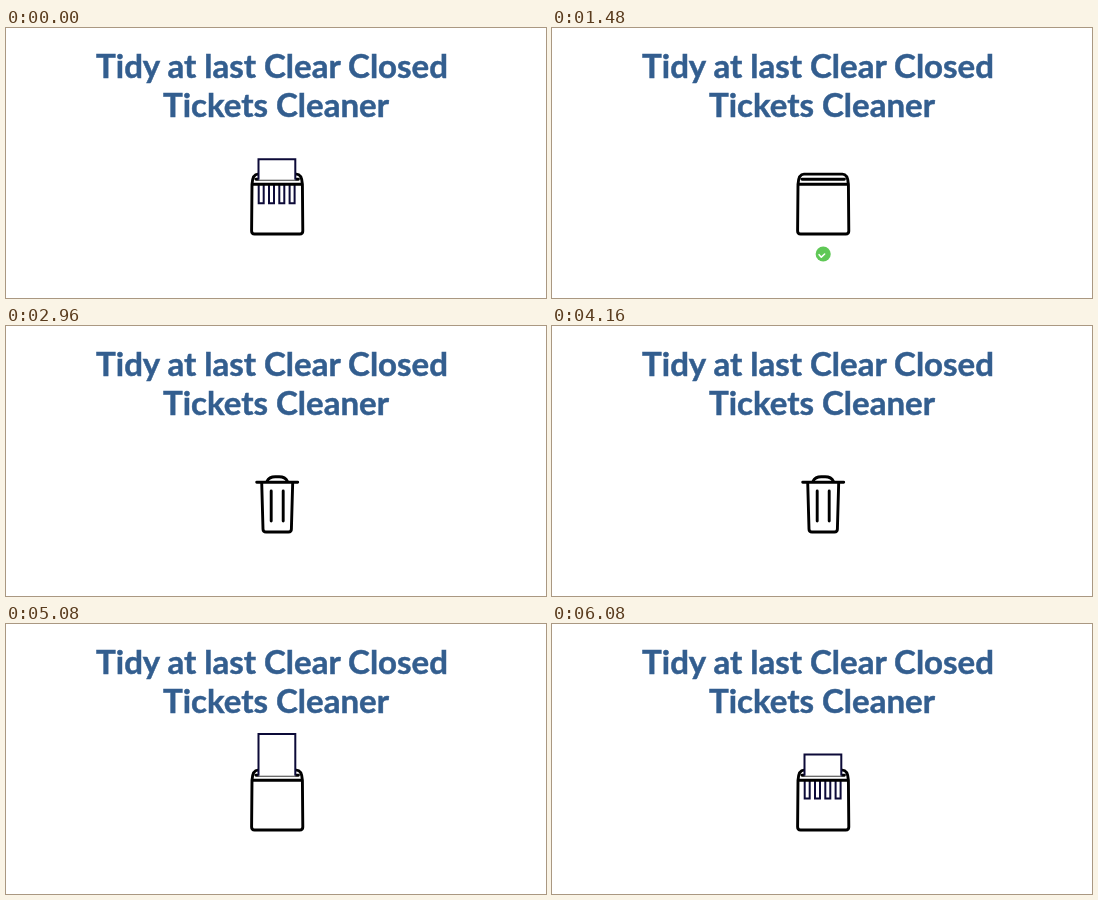
An HTML page that plays this animation: 540x270 px, repeating every 6.12 s.

```html
<!DOCTYPE html>
<html lang="en">
<head>
<meta charset="utf-8">
<title>Shredder and bin</title>
<style>
  html, body { margin: 0; width: 100%; height: 100%; overflow: hidden; background: #fff; }
  svg { display: block; width: 540px; height: 270px; }
  text { font: 700 33px Lato, sans-serif; fill: #335e8f; stroke: #335e8f; stroke-width: 0.5; text-anchor: middle; }
  path { fill: none; stroke-linecap: round; stroke-linejoin: round; }
  #bin { stroke: #000; stroke-width: 2.9; }
  #strips, #sheet { stroke: #0c0a38; stroke-width: 2; stroke-linecap: butt; stroke-linejoin: miter; }
  #sheet { fill: #fff; }
  #slit { stroke: #999; stroke-width: 1; }
  #tick { stroke: #fff; stroke-width: 2.4; }
</style>
</head>
<body>
<svg viewBox="0 0 540 270">
  <clipPath id="inside"><rect x="245" y="157" width="52" height="48"/></clipPath>
  <text x="266" y="50">Tidy at last Clear Closed</text>
  <text x="270" y="89">Tickets Cleaner</text>
  <g clip-path="url(#inside)"><path id="strips"/></g>
  <path id="bin"/>
  <path id="sheet"/>
  <path id="slit"/>
  <g id="badge">
    <circle r="12" fill="#5fc856"/>
    <path id="tick" d="M-6.5 1L-3 5L6.5-4" pathLength="1" stroke-dasharray="1 2"/>
  </g>
</svg>
<script>
const LOOP = 6120, STEP = 40, CENTER = 271.2;
const SHEET_LENGTH = 46, SLIT_Y = 152, BLADE_Y = 157;
const $ = id => document.getElementById(id);
const clamp = x => Math.max(0, Math.min(1, x));
const progress = (t, from, to) => clamp((t - from) / (to - from));
const smooth = x => x * x * (3 - 2 * x);
const easeOut = x => 1 - (1 - x) ** 3;

// Pose: half width at top and bottom, top y, bottom y, hood height, rim half width, can details
const SHREDDER = [25.2, 25.6, 156.3, 206, 10.2, 25.2, 0];
const CAN = [15.5, 14.2, 156.3, 206, 0, 20.5, 1];
const POSES = [
  [0, SHREDDER],
  [2320, SHREDDER],
  [2520, [33, 34.5, 159, 198, 2, 33, 0]],
  [2720, [14, 13, 150, 207, 0, 20, 0.8]],
  [2960, CAN],
  [4160, CAN],
  [4320, [17, 16, 157, 210, 0, 20, 0.4]],
  [4480, [26.8, 28.6, 159, 201.3, 1.5, 26.5, 0]],
  [4660, SHREDDER],
  [LOOP, SHREDDER]
];

function poseAt(t) {
  const i = POSES.findIndex(([time]) => time > t);
  const [start, from] = POSES[i - 1], [end, to] = POSES[i];
  const p = smooth(progress(t, start, end));
  return from.map((value, j) => value + (to[j] - value) * p);
}

function binPath([a, b, top, bottom, hood, rim, can]) {
  const x = dx => CENTER + dx, roof = top - hood;
  let d = `M${x(-rim)} ${top}H${x(rim)}
    M${x(-a)} ${top}L${x(-b)} ${bottom - 3}Q${x(-b)} ${bottom} ${x(3 - b)} ${bottom}
    H${x(b - 3)}Q${x(b)} ${bottom} ${x(b)} ${bottom - 3}L${x(a)} ${top}`;
  if (hood > 0.1) {
    const slot = top - hood / 2;
    d += `M${x(-a)} ${top}Q${x(0.5 - a)} ${roof} ${x(6 - a)} ${roof}
      H${x(a - 6)}Q${x(a - 0.5)} ${roof} ${x(a)} ${top}
      M${x(4 - a)} ${slot}H${x(a - 4)}`;
  }
  if (can > 0.05) {
    const knob = top - 5.5 * can, reach = 15 * can;
    d += `M${x(-10.3)} ${top - 1}Q${x(-8)} ${knob} ${x(-2)} ${knob}
      H${x(2)}Q${x(8)} ${knob} ${x(10.3)} ${top - 1}`;
    for (const dx of [-6, 6]) d += `M${x(dx)} ${180 - reach}V${180 + reach}`;
  }
  return d;
}

// The sheet starts gently, feeds steadily, then drops through the blades.
function sheetTop(u) {
  const speed = 0.0209, rampUp = 410;
  const fed = u < rampUp ? u * u / (2 * rampUp) : u - rampUp / 2;
  return 107 + speed * fed + 32 * Math.max(0, (u - 1960) / 640) ** 3;
}

function drawSheet(t) {
  const u = (t - 4800 + LOOP) % LOOP;
  const rising = t >= 4640 && t < 4800;
  const active = rising || u < 2800;
  const top = rising ? SLIT_Y - 45 * easeOut(progress(t, 4640, 4760)) : sheetTop(u);
  const bottom = top + SHEET_LENGTH;
  const visible = active && top < SLIT_Y - 1;
  $('sheet').setAttribute('d', visible ? `M252.5 ${SLIT_Y}V${top + 1}H289.3V${SLIT_Y}` : '');
  $('slit').setAttribute('d', visible ? `M253 ${SLIT_Y}H289` : '');

  let strips = '';
  if (active && !rising && bottom > BLADE_Y) {
    const start = Math.max(top, BLADE_Y - 2);
    for (let i = 0; i < 4; i++) {
      const x = 252.7 + i * 10.3;
      strips += `M${x} ${start}H${x + 5}V${bottom - 1}H${x}Z`;
    }
  }
  $('strips').setAttribute('d', strips);
}

function drawBadge(t) {
  const scale = easeOut(progress(t, 1370, 1760)) * (1 - smooth(progress(t, 2300, 2520)));
  $('badge').setAttribute('transform', `translate(${CENTER} 226) scale(${scale})`);
  $('tick').setAttribute('stroke-dashoffset', 1 - progress(t, 1370, 1530));
}

function draw(now) {
  const t = Math.floor(now % LOOP / STEP) * STEP;
  $('bin').setAttribute('d', binPath(poseAt(t)));
  drawSheet(t);
  drawBadge(t);
}

let startTime;
function frame(now) {
  startTime ??= now;
  draw(now - startTime);
  requestAnimationFrame(frame);
}
draw(0);
requestAnimationFrame(frame);
</script>
</body>
</html>
```
